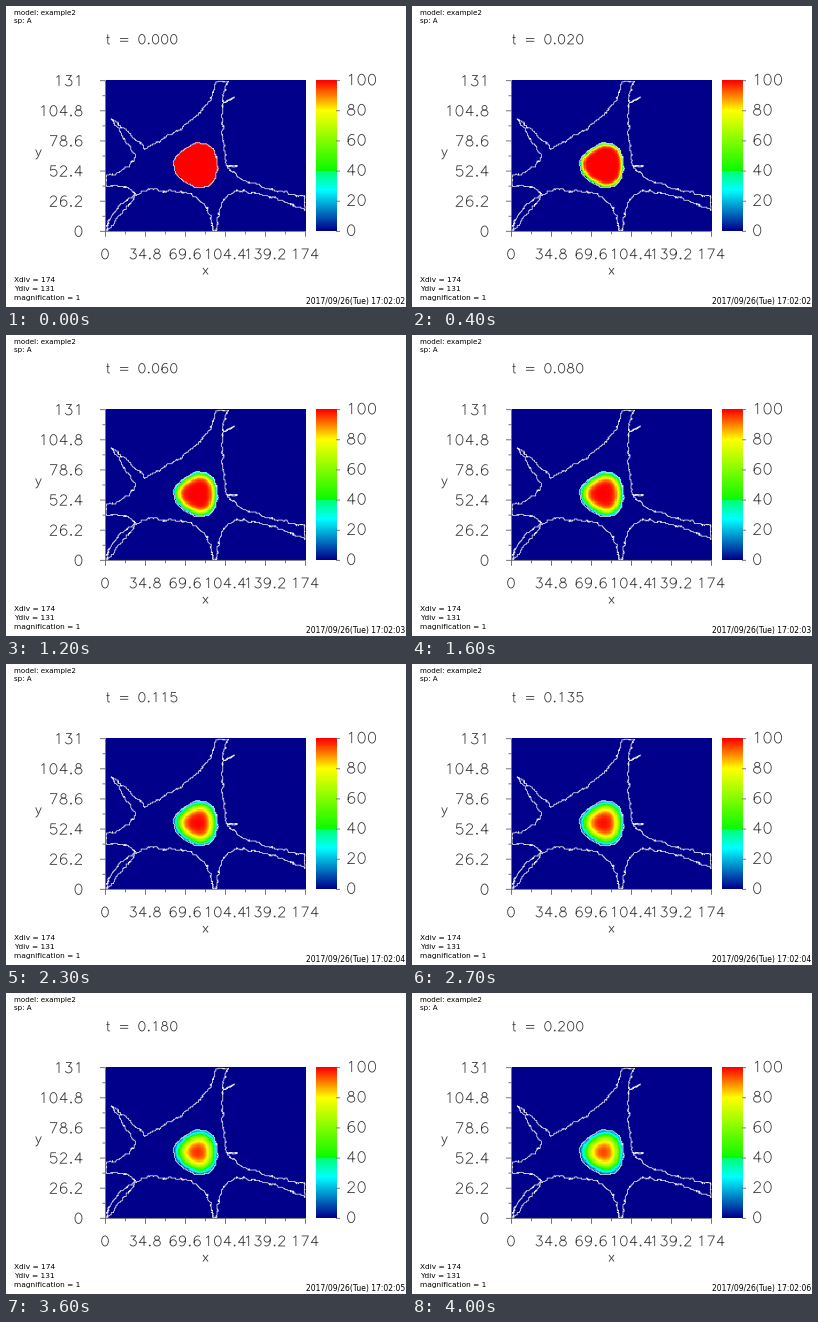
A matplotlib script that plays this animation: 400 px wide and 301 px high, repeating every 4.1 s.

```python
import numpy as np
import matplotlib.pyplot as plt
from matplotlib.animation import FuncAnimation
from matplotlib.collections import LineCollection
from matplotlib.colors import LinearSegmentedColormap
from matplotlib.path import Path

W, H, DPI = 400, 301, 64
FRAMES, INTERVAL = 41, 100
NX, NY = 174, 131
LEFT, TOP, RIGHT, BOTTOM = 99.5, 74.7, 299.5, 225.3
BAR_L, BAR_R = 309.5, 330
SPREAD = 0.68      # diffusion per frame, in cells squared
REFLECT = 0.5      # share of concentration held back at the membrane
SUBSTEPS = 5
INK = "#3a3a3a"

CMAP = LinearSegmentedColormap.from_list("heat", [
    (0.0, "#00008b"), (0.27, "#00ffff"), (0.4, "#00ff70"),
    (0.4, "#0afa00"), (0.8, "#ffff00"), (1.0, "#ff0000")], N=512)


def px(n):
    return n * 72 / DPI


# ---- stroke lettering: capital height 21, baseline at 0 ----

def arc(cx, cy, rx, ry, start=0, end=360):
    a = np.radians(np.linspace(start, end, 25))
    return list(zip(cx + rx * np.cos(a), cy + ry * np.sin(a)))


GLYPHS = {
    "0": [arc(10, 10.5, 7, 10.5)],
    "1": [[(6, 17), (11, 21), (11, 0)]],
    "2": [arc(10, 15.5, 6, 5.5, 170, -35) + [(3, 0), (17, 0)]],
    "3": [[(5, 21), (16, 21), (10, 13)] + arc(10, 6.5, 7, 6.5, 90, -157)],
    "4": [[(13, 0), (13, 21), (3, 7), (18, 7)]],
    "5": [[(15, 21), (5, 21), (4, 12)] + arc(10, 7, 7, 7, 125, -155)],
    "6": [arc(12, 11, 8, 10, 60, 180) + arc(10.5, 6.5, 6.5, 6.5, 180, 540)],
    "7": [[(3, 21), (17, 21), (7, 0)]],
    "8": [arc(10, 16.5, 5, 4.5), arc(10, 6, 7, 6)],
    "9": [arc(9.5, 14.5, 6.5, 6.5) + arc(8, 11, 8, 11, 0, -120)],
    ".": [arc(5, 1, 1, 1)],
    "t": [[(5, 21), (5, 4)] + arc(8, 3, 3, 3, 180, 300), [(2, 14), (9, 14)]],
    "=": [[(4, 12), (22, 12)], [(4, 6), (22, 6)]],
    "x": [[(3, 14), (14, 0)], [(14, 14), (3, 0)]],
    "y": [[(2, 14), (8, 0)], [(14, 14), (6, -4), (2, -7)]],
    " ": [],
}
ADVANCE = {".": 10, "t": 12, "=": 26, "x": 17, "y": 16, " ": 16}


def strokes(text, x, base, scale, align=0.0):
    """Pen strokes for text; align 0, 0.5 or 1 puts x at left, middle or right."""
    widths = [scale * ADVANCE.get(c, 20) for c in text]
    x -= align * sum(widths)
    lines = []
    for c, width in zip(text, widths):
        lines += [[(x + scale * u, base - scale * v) for u, v in s] for s in GLYPHS[c]]
        x += width
    return lines


# ---- cell geometry ----

rng = np.random.default_rng(4)
CELL = np.array([(RIGHT - LEFT) / NX, (BOTTOM - TOP) / NY])
ORIGIN = np.array([LEFT, TOP])


def bends(start, *steps):
    """Chain of quadratic curves, each step a (control, end) pair."""
    t = np.linspace(0, 1, 40)[:, None]
    parts = []
    a = np.array(start)
    for c, b in np.array(steps):
        parts.append((1 - t) ** 2 * a + 2 * t * (1 - t) * c + t ** 2 * b)
        a = b
    return np.vstack(parts)


def twig(root, tip):
    """Two steps, out to the tip and back to the root."""
    return (tip, tip), (root, root)


def ragged(p, amount):
    """Closed outline with seeded roughness, snapped to cell corners."""
    p = np.vstack([p, p[:1]])
    dist = np.r_[0, np.cumsum(np.hypot(*np.diff(p, axis=0).T))]
    s = np.arange(0, dist[-1], 0.4)
    fine = np.column_stack([np.interp(s, dist, p[:, k]) for k in (0, 1)])
    for k in (0, 1):
        noise = np.convolve(rng.normal(size=len(s)), np.ones(9) / 9, "same")
        fine[:, k] += amount * noise
    cells = np.clip(np.round((fine - ORIGIN) / CELL), 0.5, (NX - 0.5, NY - 0.5))
    return np.vstack([cells, cells[:1]])


fork, notch = (217, 97), (221, 160)
body = ragged(bends(
    (100, 170),
    ((118, 168), (130, 151)), ((116, 130), (106, 113)),      # upper left arm
    ((126, 130), (139, 142)), ((206, 112), (210, 75)),
    ((216, 75), (222, 75)), ((217, 88), fork),               # top arm
    *twig(fork, (228, 91)),
    ((215, 135), notch), *twig(notch, (231, 160)),
    ((230, 178), (299, 191)), ((299, 198), (299, 204)),      # right arm
    ((260, 187), (235, 185)), ((211, 185), (211, 225)),
    ((208, 225), (206, 225)), ((207, 186), (160, 185)),      # bottom arm
    ((138, 178), (124, 197)), ((112, 212), (101, 225)),      # lower left arm
    ((100, 208), (129, 188)), ((128, 179), (100, 180))), 1.9)

angle = np.linspace(0, 2 * np.pi, 200)
radius = 21.9 - 1.5 * np.cos(3 * angle) + 0.9 * np.cos(angle + np.pi / 4)
nucleus = ragged(np.column_stack([190.3 + radius * np.cos(angle),
                                  158.8 - radius * np.sin(angle)]), 0.8)

gx, gy = np.meshgrid(np.arange(NX) + 0.5, np.arange(NY) + 0.5)
centres = np.column_stack([gx.ravel(), gy.ravel()])
inside = Path(nucleus).contains_points(centres).reshape(NY, NX)


# ---- diffusion with a leaking membrane ----

def diffuse(u):
    for _ in range(SUBSTEPS):
        flow = np.zeros_like(u)
        for shift in [(1, 0), (-1, 0), (0, 1), (0, -1)]:
            near = np.roll(u, shift, (0, 1))
            wet = np.roll(inside, shift, (0, 1))
            flow += np.where(wet, near, REFLECT * u) - u
        u = np.where(inside, u + SPREAD / SUBSTEPS * flow, 0)
    return u


fields = [np.where(inside, 1.0, 0.0)]
while len(fields) < FRAMES:
    fields.append(diffuse(fields[-1]))


# ---- stage ----

fig = plt.figure(figsize=(W / DPI, H / DPI), dpi=DPI, facecolor="white")
ax = fig.add_axes([0, 0, 1, 1])
ax.axis("off")


def heat(values, x0, x1):
    return ax.imshow(values, cmap=CMAP, vmin=0, vmax=1, aspect="auto",
                     extent=(x0, x1, BOTTOM, TOP), interpolation="nearest")


def pen(lines, color, width):
    group = LineCollection(lines, colors=color, linewidths=px(width))
    group.set_snap(False)
    return ax.add_collection(group)


picture = heat(fields[0], LEFT, RIGHT)
heat(np.linspace(1, 0, 300)[:, None], BAR_L, BAR_R)
ax.set_xlim(0, W)
ax.set_ylim(H, 0)

pen([ORIGIN + CELL * p for p in (body, nucleus)], "#e4e4f0", 0.8)

rules = [[(LEFT, TOP), (LEFT, BOTTOM), (RIGHT, BOTTOM)]]
labels = strokes("x", 199.5, 268.5, 0.47, 0.5) + strokes("y", 32.5, 150, 0.47, 0.5)
for k in range(11):
    x = LEFT + (RIGHT - LEFT) * k / 10
    y = BOTTOM - (BOTTOM - TOP) * k / 10
    size = 3 if k % 2 else 5.5
    rules += [[(x, BOTTOM), (x, BOTTOM + size)], [(LEFT - size, y), (LEFT, y)]]
    if k % 2 == 0:
        rules.append([(BAR_R, y), (BAR_R + 4, y)])
        labels += strokes(f"{NX * k / 10:g}", x - 0.5, 253, 0.48, 0.5)
        labels += strokes(f"{NY * k / 10:g}", 77.5, y + 5.2, 0.5, 1)
        labels += strokes(str(10 * k), 340, y + 4.4, 0.52)

pen(rules, "#555555", 0.8)
pen(labels, INK, 0.85)
clock = pen([], INK, 0.85)


def note(x, y, text, size):
    return ax.text(x, y, text, fontsize=px(size), family="DejaVu Sans", color="black")


note(8.5, 8.8, "model: example2", 7.1)
note(8.5, 17.2, "sp: A", 7.1)
note(8.5, 276.5, f"Xdiv = {NX}", 7.4)
note(8.5, 285, f"Ydiv = {NY}", 7.4)
note(8.5, 293.8, "magnification = 1", 7.4)
stamp = note(299.7, 298, "", 7.6)


def update(i):
    picture.set_data(fields[i])
    clock.set_segments(strokes(f"t = {0.005 * i:.3f}", 99.5, 38, 0.455))
    second = 2 + int((i + 4) / 10.5)
    stamp.set_text(f"2017/09/26(Tue) 17:02:{second:02d}")
    return picture, clock, stamp


anim = FuncAnimation(fig, update, frames=FRAMES, interval=INTERVAL,
                     repeat=True, repeat_delay=0, blit=False)
plt.show()
```
